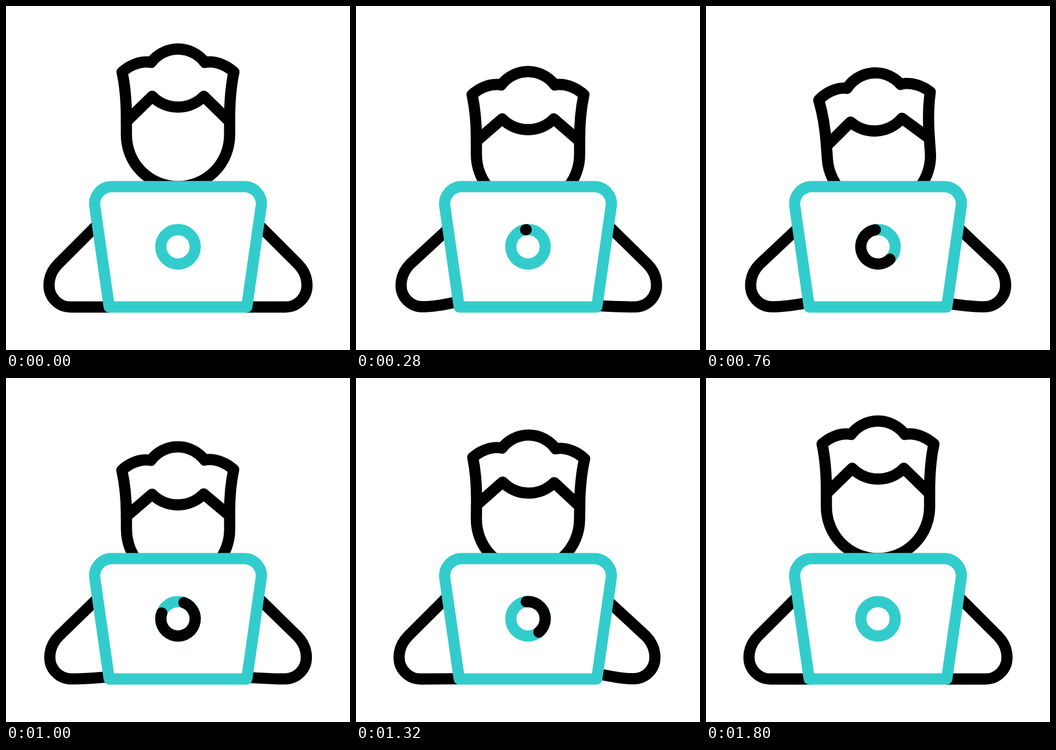
These frames come from a looping animation (640 px wide and 640 px high, 2 s). An HTML page:

```html
<!DOCTYPE html>
<html lang="en">
<head>
<meta charset="utf-8">
<title>Working at a laptop</title>
<style>
  html, body { margin: 0; width: 100%; height: 100%; overflow: hidden; background: #fff; }
  svg { display: block; width: 100vw; height: 100vh; }
  path, circle { fill: none; stroke: #000; stroke-width: 20.8; stroke-linecap: round; stroke-linejoin: round; }
  .teal { stroke: #3cc; }
  .screen { fill: #fff; }
</style>
</head>
<body>
<svg viewBox="0 0 640 640">
  <path id="leftArm"/>
  <path id="rightArm" transform="translate(640 0) scale(-1 1)"/>
  <g id="head">
    <path id="outline"/>
    <path id="fringe"/>
  </g>
  <path class="teal screen" d="M192 560L165.3 373A32 32 0 0 1 197 336H443A32 32 0 0 1 474.7 373L448 560Z"/>
  <circle class="teal" cx="320" cy="448" r="32"/>
  <path id="sweep"/>
</svg>
<script>
const LOOP = 2000, STEP = 40;
const el = id => document.getElementById(id);
const lerp = (a, b, k) => a + (b - a) * k;
const smooth = u => u * u * (3 - 2 * u);

// Keyframes are [time, value] pairs, eased in and out between neighbours.
function track(keys, t) {
  if (t <= keys[0][0]) return keys[0][1];
  for (let i = 1; i < keys.length; i++) {
    const [t0, a] = keys[i - 1], [t1, b] = keys[i];
    if (t < t1) return lerp(a, b, smooth((t - t0) / (t1 - t0)));
  }
  return keys[keys.length - 1][1];
}

const drop = [[40, 0], [280, 42], [600, 42], [985, 48], [1000, 48], [1680, 0]];
const tilt = [[600, 0], [790, -4.5], [1230, 4.5], [1350, 0]];
const leftLift = [[40, 0], [257, 1], [475, 0], [692, 1], [910, 0], [1127, 1], [1345, 0]];
const rightLift = [[200, 0], [455, 1], [640, 0], [840, 1], [1090, 0], [1300, 1], [1500, 0]];
const sweepLead = [[240, 6], [1150, 366]];
const sweepTail = [[705, 6], [1800, 366]];

function armPath(k) {
  const x = v => v + 4 * k;
  return `M192 ${560 - 11 * k}C168 ${560 - 5 * k} ${144 - 2 * k} ${560 - k / 2} ${x(120)} ${560 - k / 2}` +
    `C${x(98)} 560 ${x(80)} 542 ${x(80)} 520` +
    `C${x(80)} 505 ${x(86)} 491 ${x(97)} 480L190 ${387 + 11 * k}`;
}

// The hair travels a little further than the face.
function drawHead(dy, angle) {
  const hair = v => v + dy, face = v => v + dy * 0.87;
  el('outline').setAttribute('d',
    `M224 ${face(240)}V${face(212)}C224 ${face(178)} 221 ${hair(146)} 216 ${hair(123)}` +
    `C229 ${hair(111)} 246 ${hair(104)} 261 ${hair(104)}Q266 ${hair(104)} 270 ${hair(105)}` +
    `A62.5 62.5 0 0 1 370 ${hair(105)}Q374 ${hair(104)} 379 ${hair(104)}` +
    `C394 ${hair(104)} 411 ${hair(111)} 424 ${hair(123)}` +
    `C419 ${hair(146)} 416 ${face(178)} 416 ${face(212)}V${face(240)}` +
    `A96 96 0 0 1 224 ${face(240)}Z`);
  el('fringe').setAttribute('d',
    `M224 ${face(215)}L272 ${hair(168)}A67.6 67.6 0 0 0 368 ${hair(168)}L416 ${face(215)}`);
  el('head').setAttribute('transform', `rotate(${angle} 320 256)`);
}

// Angles run counterclockwise from the top of the ring.
function sweepPath(from, to) {
  if (to - from < 0.01) return '';
  const point = deg => {
    const a = deg * Math.PI / 180;
    return `${320 - 32 * Math.sin(a)} ${448 - 32 * Math.cos(a)}`;
  };
  return `M${point(from)}A32 32 0 ${to - from > 180 ? 1 : 0} 0 ${point(to)}`;
}

function render(t) {
  drawHead(track(drop, t), track(tilt, t));
  el('leftArm').setAttribute('d', armPath(track(leftLift, t)));
  el('rightArm').setAttribute('d', armPath(track(rightLift, t)));
  el('sweep').setAttribute('d', sweepPath(track(sweepTail, t), track(sweepLead, t)));
}

const start = performance.now();
function tick() {
  const t = (performance.now() - start) % LOOP;
  render(Math.floor(t / STEP) * STEP);
  requestAnimationFrame(tick);
}
tick();
</script>
</body>
</html>
```
